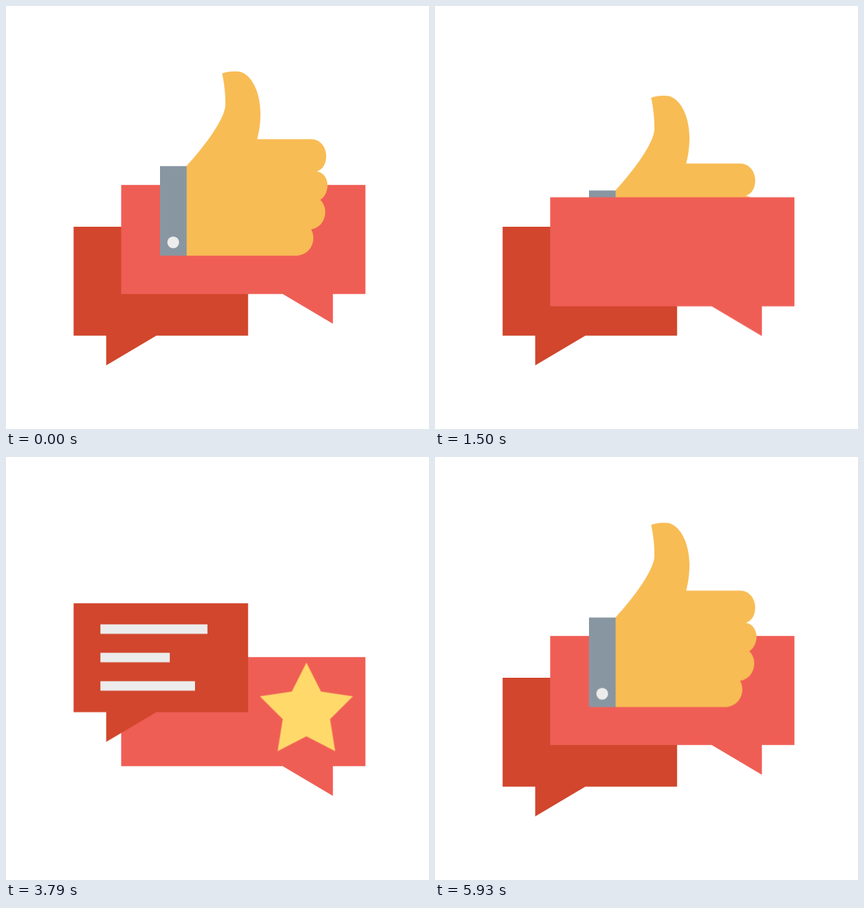
Animation of 640x640 px, one loop 6000 ms. Source, as an HTML page:

```html
<!DOCTYPE html>
<html lang="en">
<head>
<meta charset="utf-8">
<title>Feedback bubbles</title>
<style>
  html, body { margin: 0; width: 100%; height: 100%; overflow: hidden; background: #fff; }
  svg { display: block; width: 100vw; height: 100vh; }

  .dark, .pink, .hand, .slide, .pop, .line, .layer {
    animation: 6s cubic-bezier(.333, 0, .667, 1) infinite both;
  }
  .dark { animation-name: dark; }
  .pink { animation-name: pink; }
  .hand { animation-name: hand; }

  /* Beziers: (.333 .667 .667 1) slows like a throw, (.333 0 .667 .333) drops like a fall */
  @keyframes dark {
    0% { transform: translateY(0); }
    11.17% { transform: translateY(31.5px); }
    22.33% { transform: translateY(0); }
    32.08% { transform: translateY(0); animation-timing-function: cubic-bezier(.333, .667, .667, 1); }
    42.7%, 43.33% { transform: translateY(-237px); }
    53.33%, 69.17% { transform: translateY(-112.7px); }
    79.42% { transform: translateY(-198.9px); }
    90%, 100% { transform: translateY(0); }
  }
  @keyframes pink {
    0% { transform: translateY(0); animation-timing-function: cubic-bezier(.333, 0, .667, .333); }
    16.67% { transform: translateY(10.3px); animation-timing-function: linear; }
    34.5% { transform: translateY(28px); animation-timing-function: cubic-bezier(.333, .667, .667, 1); }
    43.33% { transform: translateY(45px); }
    53.33%, 69.17% { transform: translateY(32px); }
    79.42% { transform: translateY(83.3px); }
    90%, 100% { transform: translateY(0); }
  }
  @keyframes hand {
    0% { transform: translateY(0); }
    12.75% { transform: translateY(70px); }
    20.33% { transform: translateY(-93px); animation-timing-function: cubic-bezier(.333, 0, .667, .333); }
    27.43% { transform: translateY(205px); }
    90.43% { transform: translateY(337px); animation-timing-function: cubic-bezier(.333, 1, .667, 1); }
    100% { transform: translateY(0); }
  }

  /* Stacking order changes while the shapes are apart */
  .layer { animation-timing-function: step-end; }
  .dark-back { animation-name: dark-back; }
  .dark-front { animation-name: dark-front; }
  .hand-back { animation-name: hand-back; }
  .hand-front { animation-name: hand-front; }
  @keyframes dark-back { 0%, 79.42%, 100% { opacity: 1; } 43% { opacity: 0; } }
  @keyframes dark-front { 0%, 79.42%, 100% { opacity: 0; } 43% { opacity: 1; } }
  @keyframes hand-back { 0%, 27.5%, 100% { opacity: 0; } 20.33% { opacity: 1; } }
  @keyframes hand-front { 0%, 90.43%, 100% { opacity: 1; } 20.33% { opacity: 0; } }

  /* Three stars pop in one after another, then merge into a big one */
  .slide { animation-name: slide; }
  .pop { animation-name: pop; }
  .big { animation-name: big; }
  @keyframes slide {
    0%, 46.05% { transform: translate(var(--x), 346px); }
    56.72% { transform: translate(454.5px, 346px); }
    75% { transform: translate(454.5px, 346px); animation-timing-function: cubic-bezier(.333, 0, .667, .333); }
    84.67%, 100% { transform: translate(454.5px, 479px); }
  }
  @keyframes pop {
    0%, 29.82% { transform: scale(0); }
    34.15% { transform: scale(1.25); }
    37.5%, 55% { transform: scale(1); }
    55.1%, 100% { transform: scale(0); }
  }
  @keyframes big {
    0%, 33.9% { transform: scale(0); }
    38.23% { transform: scale(1.25); }
    41.57%, 46.05% { transform: scale(1); }
    56.72% { transform: scale(1.65); }
    75% { transform: scale(1.65); animation-timing-function: cubic-bezier(.333, 0, .667, .333); }
    84.67%, 100% { transform: scale(0); }
  }

  .line {
    transform-box: fill-box;
    transform-origin: left;
    animation-name: line;
    animation-delay: calc(var(--i) * 70ms);
  }
  @keyframes line {
    0%, 53.8% { transform: scaleX(0); }
    60.5%, 64.4% { transform: scaleX(1); }
    71%, 100% { transform: scaleX(0); }
  }
</style>
</head>
<body>
<svg viewBox="0 0 640 640">
  <defs>
    <path id="dark" fill="#d1462c" d="M102.3 334H366.3V498.8H227.5L151.6 543.8V498.8H102.3Z"/>
    <path id="star" fill="#ffd96a" d="M0-40.6 13.4-14.1 42.7-9.6 21.7 11.3 26.4 40.6 0 27.1-26.4 40.6-21.7 11.3-42.7-9.6-13.4-14.1Z"/>
    <g id="hand">
      <path fill="#f8bc54" d="M273 242.2C300 213 332 170 332 149C332 131 330 116 327 102
        C333 99.5 340 99 349 99C370 99 385 129 385 162C385 178 383 190 380 201.4
        H462C475 201.4 484.5 213 484.5 227C484.5 239 479 248 470 250.2
        C480 251 486.5 261 486.5 271C486.5 281 482 289 475.5 293.3
        C480 298 483 304 483 311C483 326 474 336 461.5 338
        C464 342 465 346 465 351C465 366 454 377.8 438 377.8H273Z"/>
      <path fill="#8896a2" d="M233 242.2H273.3V377.8H233Z"/>
      <circle cx="253" cy="357.6" r="8.9" fill="#ececec"/>
    </g>
    <clipPath id="pocket"><rect class="pink" y="-500" width="640" height="934.5"/></clipPath>
    <clipPath id="panel"><rect x="174.3" y="270.8" width="369.5" height="165"/></clipPath>
  </defs>

  <g class="layer dark-back"><use href="#dark" class="dark"/></g>

  <g class="layer hand-back">
    <g clip-path="url(#pocket)"><use href="#hand" class="hand"/></g>
  </g>

  <g class="pink">
    <path fill="#ef5e55" d="M174.3 270.8H543.8V435.8H494.6V480.8L418.7 435.8H174.3Z"/>
    <g clip-path="url(#panel)">
      <g class="slide" style="--x:243.2px"><use href="#star" class="pop"/></g>
      <g class="slide" style="--x:358.4px"><use href="#star" class="pop" style="animation-delay:122ms"/></g>
      <g class="slide" style="--x:473.6px"><use href="#star" class="pop big"/></g>
    </g>
  </g>

  <g class="layer dark-front">
    <g class="dark" fill="#ececec">
      <use href="#dark"/>
      <rect class="line" style="--i:0" x="142.8" y="365.9" width="162" height="14.4"/>
      <rect class="line" style="--i:1" x="142.8" y="408.9" width="105" height="14.4"/>
      <rect class="line" style="--i:2" x="142.8" y="451.9" width="143.2" height="14.4"/>
    </g>
  </g>

  <g class="layer hand-front">
    <g clip-path="url(#pocket)"><use href="#hand" class="hand"/></g>
  </g>
</svg>
</body>
</html>
```
